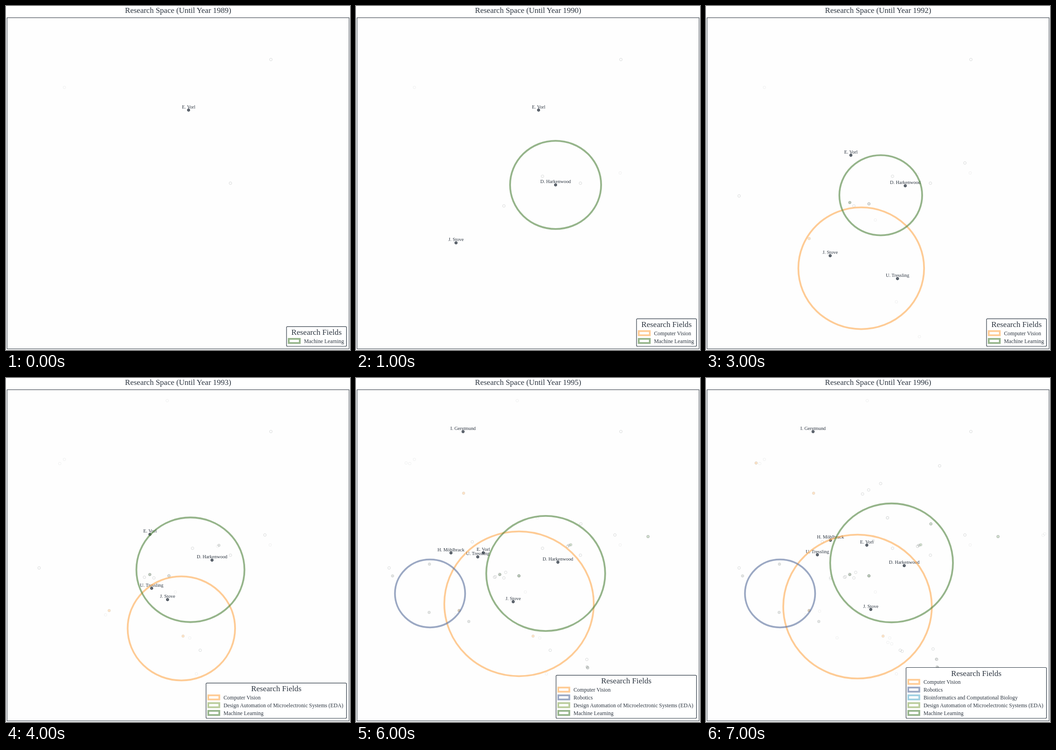
An HTML page that plays this animation: 748x748 px, repeating every 8 s.

```html
<!DOCTYPE html>
<html lang="en">
<head>
<meta charset="utf-8">
<title>Research Space</title>
<style>
  html, body { margin: 0; width: 100%; height: 100%; overflow: hidden; background: #fff; }
  svg { display: block; width: 748px; height: 748px; }
  text { font-family: "Liberation Serif", "Times New Roman", serif; fill: #2c3540; }
  .title { font-size: 17px; text-anchor: middle; }
  .head { font-size: 17.2px; text-anchor: middle; }
  .name { font-size: 10.45px; text-anchor: middle; }
  .item { font-size: 11.8px; }
  .frame { fill: #fefefe; stroke: #3a434d; stroke-width: 1.1; }
  .legend { fill: #fff; stroke: #2f3a46; stroke-width: 1.2; }
  .person { fill: #2d3440; fill-opacity: .72; stroke: #2f3a46; stroke-width: 1; }
  .field { fill: none; stroke-width: 3.8; stroke-opacity: .6; }
  .paper { stroke: #46504f; stroke-width: 1; }
</style>
</head>
<body>
<svg id="stage" viewBox="0 0 748 748"></svg>
<script>
const FIELDS = {
  cv: ["Computer Vision", "rgb(255,170,80)"],
  ro: ["Robotics", "rgb(90,113,157)"],
  bio: ["Bioinformatics and Computational Biology", "rgb(97,177,207)"],
  eda: ["Design Automation of Microelectronic Systems (EDA)", "rgb(142,172,93)"],
  ml: ["Machine Learning", "rgb(80,132,62)"]
};

const PEOPLE = {
  z: "E. Vorl", w: "D. Harkenwood", b: "J. Stove",
  s: "U. Tressling", k: "H. Möhlbrack", o: "I. Gerstmund"
};

// paper styles: fill, fill opacity, stroke opacity
const STYLES = {
  open: ["none", 0, .2],
  faint: ["none", 0, .08],
  grey: ["#59615f", .16, .16],
  green: ["#50843e", .24, .2],
  amber: ["#ffa03c", .28, .12]
};

// fields: [cx, cy, rx]; people: [x, y]; papers: those new in that year
const YEARS = [
  {
    legend: ["ml"], fields: {},
    people: { z: [397, 226.3] },
    papers: { open: [[576, 116.4], [488, 385.3]], faint: [[127, 177]] }
  },
  {
    legend: ["cv", "ml"], fields: { ml: [434, 389, 99] },
    people: { z: [397, 226.3], w: [434, 389], b: [217.5, 515] },
    papers: { open: [[405.6, 370.2], [321.6, 434.7]], faint: [[574.5, 363]] }
  },
  {
    legend: ["cv", "ml"],
    fields: { cv: [318.5, 552, 135.5], ml: [339.5, 415, 110.5] },
    people: { z: [315, 324.4], w: [444, 388], b: [222, 509.8], s: [416.4, 592.8] },
    papers: {
      open: [[563, 341.3], [72, 413], [354.3, 430.2]],
      faint: [[368.3, 465.3], [464, 719]], green: [[312.7, 427.3]]
    }
  },
  {
    legend: ["cv", "ml"],
    fields: { cv: [337.5, 570.2, 136.7], ml: [380, 411.5, 90] },
    people: { z: [315, 324.4], w: [433.3, 390.9], b: [270, 543], s: [416.4, 592.8] },
    papers: {
      faint: [[414, 643.3], [460, 366]],
      grey: [[354.3, 430.2], [312.7, 427.3]], amber: [[224.3, 505.7]]
    }
  },
  {
    legend: ["cv", "eda", "ml"],
    fields: { cv: [381.3, 544.5, 116.8], ml: [401, 417, 117.5] },
    people: { z: [313, 340], w: [448, 396], b: [351.3, 481.9], s: [316.7, 457.2] },
    papers: {
      open: [[301, 433.2], [422.3, 592]],
      faint: [[117, 186], [350.5, 49.3], [216.5, 515], [399.5, 565.3]],
      grey: [[463, 363.8]], amber: [[385, 561.2]]
    }
  },
  {
    legend: ["cv", "eda", "ml"],
    fields: { cv: [381.3, 544.5, 116.8], ml: [411, 421.3, 119.8] },
    people: { z: [312.7, 351.3], w: [464.4, 400], b: [351.3, 481.9], s: [316.7, 457.2] },
    papers: {
      open: [[489, 317.2], [635, 344.8], [503.8, 630.2], [460, 366]],
      green: [[467, 362.6]], faint: [[311.5, 426]]
    }
  },
  {
    legend: ["cv", "ro", "eda", "ml"],
    fields: { cv: [354.5, 491, 162.5], ro: [161, 468.5, 76.3], ml: [412.5, 425, 129.3] },
    people: {
      z: [276.8, 380], w: [439, 400.5], b: [341.8, 486.4],
      s: [264.7, 389], k: [206.5, 380.3], o: [232.8, 116.6]
    },
    papers: {
      open: [[252.8, 356.2], [325.5, 422.7], [303, 432.3], [502, 612]],
      faint: [[109, 184.8], [394.7, 304]],
      grey: [[159.7, 404.7], [79.5, 430.3], [159, 509.7], [245.3, 529.4],
        [502.5, 628], [503.8, 630.2], [224.3, 505.7]],
      green: [[635, 344.8], [354.3, 430.2]], amber: [[234, 250.5]]
    }
  },
  {
    legend: ["cv", "ro", "bio", "eda", "ml"],
    fields: { cv: [329.5, 497, 161.5], ro: [161, 468.5, 76.3], ml: [403.5, 402, 133.5] },
    people: {
      z: [349.7, 363.4], w: [431, 408], b: [358.3, 503.3],
      s: [242.2, 384.4], k: [270.6, 352.8], o: [232.8, 116.6]
    },
    papers: {
      open: [[508, 191], [379.7, 229.5], [353.7, 243.4], [340.4, 252.2], [394.7, 304],
        [363.5, 354], [426.5, 594.2], [493.7, 589.2], [271, 434.5]],
      faint: [[736.5, 339], [733, 342], [247, 507], [285, 565], [395.5, 575],
        [403.8, 578], [270.5, 437]],
      grey: [[501, 611.3]], green: [[489, 317.2]], amber: [[109, 184.8]]
    }
  }
];

const STEP = 1000;
const stage = document.getElementById("stage");

const label = (cls, x, y, str) => `<text class="${cls}" x="${x}" y="${y}">${str}</text>`;

function paper([x, y], style) {
  const [fill, alpha, line] = STYLES[style];
  return `<circle class="paper" cx="${x}" cy="${y}" r="2.9" fill="${fill}"
    fill-opacity="${alpha}" stroke-opacity="${line}"/>`;
}

function papersUntil(i) {
  let out = "";
  for (const { papers } of YEARS.slice(0, i + 1))
    for (const style in papers)
      for (const p of papers[style]) out += paper(p, style);
  return out;
}

function ring(key, [x, y, r]) {
  return `<ellipse class="field" cx="${x}" cy="${y}" rx="${r}" ry="${r * .968}"
    stroke="${FIELDS[key][1]}"/>`;
}

function person(key, [x, y]) {
  return `<circle class="person" cx="${x}" cy="${y}" r="2.8"/>` +
    label("name", x, y - 3.6, PEOPLE[key]);
}

function legend(keys) {
  const left = keys.includes("eda") ? 435 : 610;
  const top = 714 - 16.9 * keys.length;
  let out = `<rect class="legend" x="${left}" y="${top}" width="${740.4 - left}"
    height="${740 - top}" rx="2"/>` +
    label("head", (left + 740.4) / 2, top + 18, "Research Fields");
  keys.forEach((key, i) => {
    const y = 729 - 16.9 * (keys.length - 1 - i);
    const [name, color] = FIELDS[key];
    out += `<rect class="field" x="${left + 4.8}" y="${y - 5.2}" width="24" height="9"
      stroke="${color}"/>` + label("item", left + 38, y + 4, name);
  });
  return out;
}

function draw(i) {
  const { fields, people, legend: keys } = YEARS[i];
  const each = (set, fn) => Object.entries(set).map(([k, v]) => fn(k, v)).join("");
  stage.innerHTML =
    label("title", 374.3, 15, `Research Space (Until Year ${1989 + i})`) +
    `<rect class="frame" x="2.3" y="25.5" width="743.7" height="720"/>` +
    papersUntil(i) + each(people, person) + each(fields, ring) + legend(keys);
}

let shown = -1;
function tick() {
  const i = Math.floor(performance.now() / STEP) % YEARS.length;
  if (i !== shown) draw(shown = i);
  requestAnimationFrame(tick);
}
tick();
</script>
</body>
</html>
```
